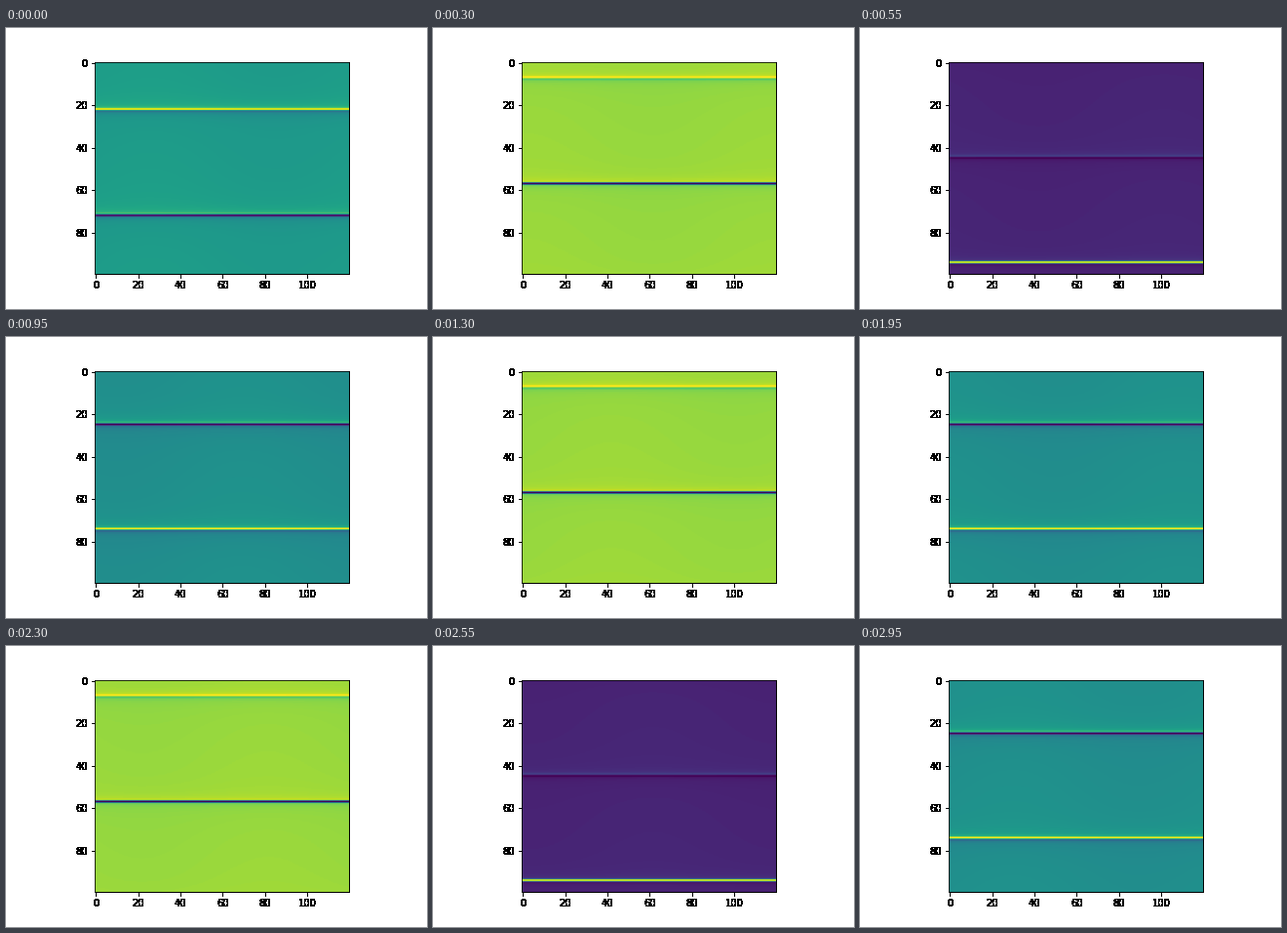
Recreate the animation shown at these times as a matplotlib script. Size 432 by 288 pixels, loop 3000 ms.

```python
import numpy as np
import matplotlib.pyplot as plt
from matplotlib.animation import FuncAnimation

FRAMES = 60

plt.rcParams["figure.subplot.bottom"] = 0.125

x = np.linspace(0, 2 * np.pi, 120)
y = np.linspace(0, 2 * np.pi, 100).reshape(-1, 1)


def field(i):
    """Sine across plus tangent down, both phases advancing each step."""
    step = i + 1
    return np.sin(x + step * np.pi / 15) + np.tan(y + step * np.pi / 20)


def harden(img, dpi):
    """Make every touched pixel opaque, so text and lines have hard edges."""
    out = np.round(img * 255).astype(np.uint8)
    out[..., 3] = np.where(out[..., 3] > 0, 255, 0)
    return out, 0, 0


fig, ax = plt.subplots(figsize=(6, 4), dpi=72, facecolor="white")
ax.set_agg_filter(harden)
im = ax.imshow(field(0), cmap="viridis")
ax.set_xticks(range(0, 101, 20))
ax.set_yticks(range(0, 81, 20))


def update(i):
    z = field(i)
    im.set_data(z)
    im.set_clim(z.min(), z.max())
    return [im]


anim = FuncAnimation(fig, update, frames=FRAMES, interval=50,
                     repeat=True, repeat_delay=0, blit=False)
plt.show()
```
